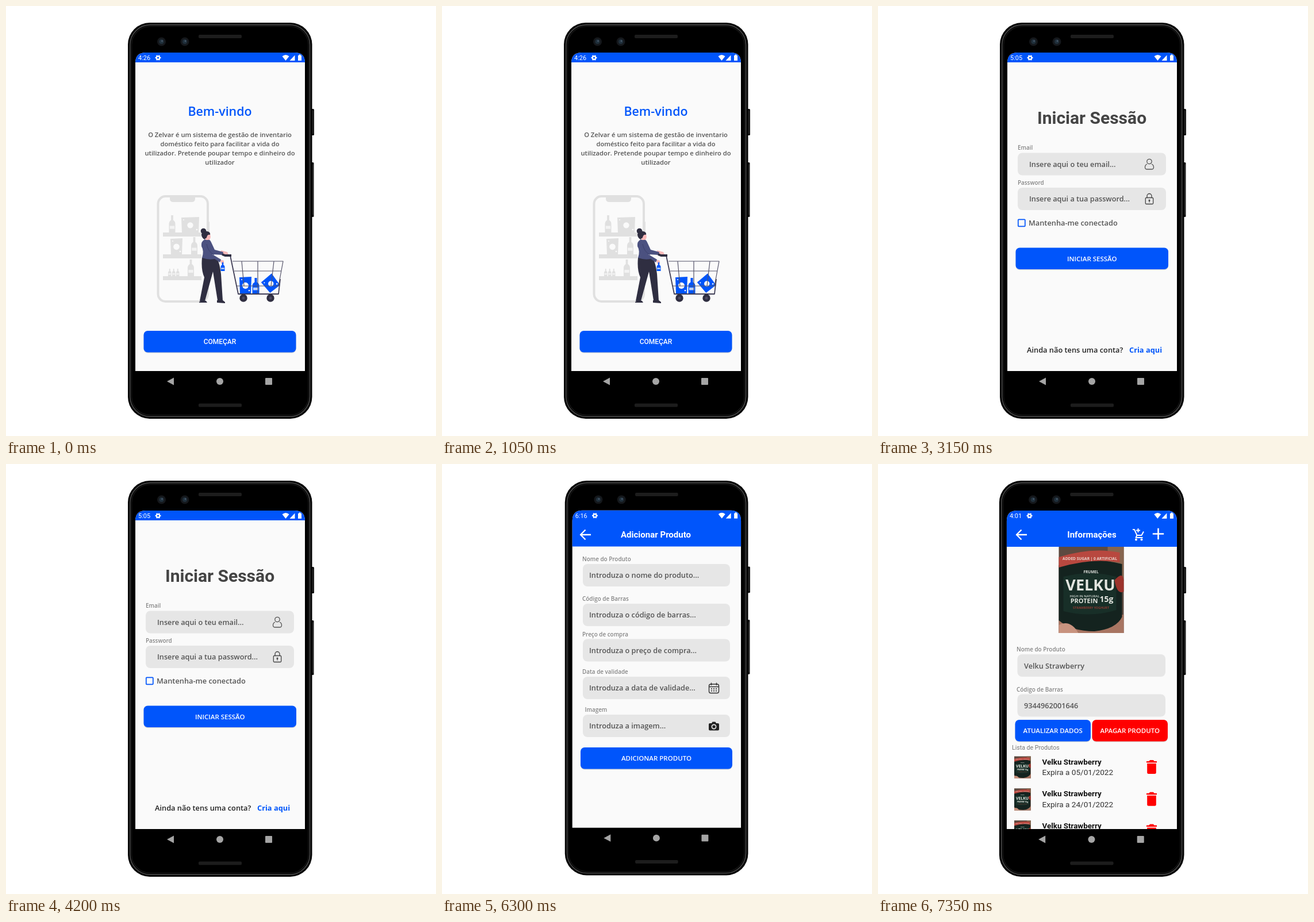
An HTML page for the animation above (8 s loop, 748 by 748 pixels).

```html
<!DOCTYPE html>
<html lang="pt">
<head>
<meta charset="utf-8">
<title>Inventário</title>
<style>
  html, body { margin: 0; width: 100%; height: 100%; overflow: hidden; background: #fff; }
  svg { display: block; width: 100%; height: 100%; }
  .os { font-family: "Open Sans", "Noto Sans", sans-serif; }
  .rb { font-family: Roboto, sans-serif; }
</style>
</head>
<body>
<svg id="stage" viewBox="0 0 748 748"></svg>
<script>
const LOOP = 8000;
const BLUE = '#0055fb', INK = '#2f2e41', GREY = '#e0e0e0', FIELD = '#e6e6e6', SKIN = '#f9b9b9';

// Basic shapes
const rect = (x, y, w, h, fill, r = 0, more = '') =>
  `<rect x="${x}" y="${y}" width="${w}" height="${h}" rx="${r}" fill="${fill}" ${more}/>`;
const circle = (x, y, r, fill, more = '') => `<circle cx="${x}" cy="${y}" r="${r}" fill="${fill}" ${more}/>`;
const path = (d, fill, more = '') => `<path d="${d}" fill="${fill}" ${more}/>`;
const line = (d, color, w = 1.4, more = '') =>
  path(d, 'none', `stroke="${color}" stroke-width="${w}" stroke-linejoin="round" ${more}`);
const at = (x, y, body, s = 1) => `<g transform="translate(${x} ${y}) scale(${s})">${body}</g>`;

const text = (font, s, x, y, size, fill, weight, anchor) =>
  `<text class="${font}" x="${x}" y="${y}" font-size="${size}" fill="${fill}"` +
  ` font-weight="${weight}" text-anchor="${anchor}">${s}</text>`;
const sans = (s, x, y, size, fill, weight = 600, anchor = 'start') => text('os', s, x, y, size, fill, weight, anchor);
const robo = (s, x, y, size, fill, weight = 400, anchor = 'start') => text('rb', s, x, y, size, fill, weight, anchor);

// Icons, centred on the origin
const gear = (r, color) =>
  circle(0, 0, r * .55, 'none', `stroke="${color}" stroke-width="${r * .45}"`) +
  circle(0, 0, r * .86, 'none',
    `stroke="${color}" stroke-width="${r * .28}" pathLength="12" stroke-dasharray="1 1" stroke-dashoffset=".5"`);
const plus = (r, w = 2.6) => line(`M${-r} 0H${r}M0 ${-r}V${r}`, '#fff', w);
const user = circle(0, -4.5, 4.2, 'none', 'stroke="#555" stroke-width="1.3"') +
  line('M-4 0Q-7.5 1.5-7.5 5.5Q-7.5 9-4 9H4Q7.5 9 7.5 5.5Q7.5 1.5 4 0', '#555', 1.3);
const mail = line('M-8.5-6H8.5V6H-8.5ZL0 1.5L8.5-6M-8.5-6L0 1.5M-8.5 6L-2.5-.7M8.5 6L2.5-.7', '#444', 1.2);
const lock = rect(-6.7, -2, 13.4, 11, 'none', 1.5, 'stroke="#444" stroke-width="1.3"') +
  line('M-4-2V-5A4 4 0 0 1 4-5V-2', '#444', 1.3) + circle(0, 2.5, 1.5, '#444') + line('M0 3V6', '#444', 1.3);
const calendar = rect(-8.5, -7, 17, 15.5, 'none', 3, 'stroke="#333" stroke-width="1.4"') +
  line('M-8.5-2.5H8.5M-4.5-9.5V-5M4.5-9.5V-5', '#333') +
  line('M-5 1.2H5.5M-5 4.7H5.5', '#333', 1.8, 'stroke-dasharray="2 2"');
const camera = path('M-7-5H-4L-2.5-7.5H2.5L4-5H7Q9-5 9-3V5.5Q9 7.5 7 7.5H-7Q-9 7.5-9 5.5V-3Q-9-5-7-5Z', '#222') +
  circle(0, 1, 3.6, '#222', 'stroke="#e6e6e6" stroke-width="1.7"');
const back = line('M9.5 0H-8M0-8.5L-8.5 0L0 8.5', '#fff', 2.4);
const trash = path('M-9-10H-4.5L-3-12H3L4.5-10H9V-7.5H-9ZM-7.8-6H7.8V9.5Q7.8 12 5.3 12H-5.3Q-7.8 12-7.8 9.5Z', '#f00');
const cartIcon = line('M-9.5-8.5H-6.5L-2 1.5H6L9.5-5M-2 1.5L-4 5.5H8M0-10.5V-3.5M-3.5-7H3.5', '#fff', 1.9) +
  circle(-3.5, 9, 2, '#fff') + circle(6, 9, 2, '#fff');
const home = path('M0-7L8 .3H5.5V6.5H1.8V2H-1.8V6.5H-5.5V.3H-8Z', '#444');
const folder = path('M-6.5-6H-2L0-4H6.5Q8-4 8-2.5V4.5Q8 6 6.5 6H-6.5Q-8 6-8 4.5V-4.5Q-8-6-6.5-6Z', '#0a2f92');
const basket = path('M-8.5-1.5H8.5L6.3 7H-6.3Z', '#444') + line('M-5-1L0-7L5-1', '#444', 1.8) + circle(0, 2.7, 1.8, '#fff');

// Widgets
const field = (x, y, right, h = 39) => rect(x, y, right - x, h, FIELD, 8);
const label = (s, x, y) => sans(s, x, y, 9.9, '#858585');
const hint = (s, x, y) => sans(s, x, y, 12.7, '#555');
const button = (s, x, y, w, fill = BLUE, write = sans, size = 11.5, weight = 600) =>
  rect(x, y + 1.3, w, 37.5, '#000', 7, 'opacity=".14"') + rect(x, y, w, 37.5, fill, 7) +
  write(s, x + w / 2, y + 23, size, '#fff', weight, 'middle');
const checkbox = (x, y) => rect(x, y, 12, 12, 'none', 1, `stroke="${BLUE}" stroke-width="1.7"`);
const title = s => robo(s, 372, 205, 30, '#444', 700, 'middle');
const bar = s => robo(s, 372, 127.5, 15, '#fff', 700, 'middle');

// Device, clock and system bars; sx and sy absorb the slight size differences
function device(clock, headerBottom, sx = 1, sy = 1) {
  const grille = y => rect(335, y, 75, 6, '#1d1d1d', 2);
  const lens = x => circle(x, 62, 7.5, '#15181c') + circle(x, 62, 4, '#20303c') + circle(x + 1, 61, 1.4, '#48596a');
  return `<g transform="matrix(${sx} 0 0 ${sy} ${532 * (1 - sx)} ${29 * (1 - sy)})">` +
    rect(529, 179, 7, 46, '#111', 1.5) + rect(529, 272, 6.5, 95, '#111', 1.5) +
    line('M534 182V222M534 276V363', '#3a3a3a', 1) +
    rect(212, 29, 320.5, 689, '#050505', 38) +
    rect(215.8, 32.8, 312.8, 681.4, '#000', 35, 'stroke="#505050" stroke-width="1.4"') +
    rect(218.5, 35.5, 307.5, 676, '#000', 32, 'stroke="#161616" stroke-width="1.5"') +
    grille(50) + grille(691.5) + lens(270.5) + lens(311) +
    path('M225 635V99Q225 81 243 81H502Q520 81 520 99V635Z', '#fafafa') +
    path(`M225 ${headerBottom}V99Q225 81 243 81H502Q520 81 520 99V${headerBottom}Z`, BLUE) +
    robo(clock, 230, 94, 11, '#fff') + at(264.5, 90, gear(5, '#fff')) +
    path('M480.5 87.5Q486.5 82.5 492.5 87.5L486.5 95ZM493.5 95L502.5 85.5V95Z', '#fff') +
    path('M508 86H509.5V84.5H512.5V86H514V95H508Z', '#fff') +
    path('M280 653L292 646.5V659.5Z', '#a5a5a5') + circle(372, 653, 6, '#a5a5a5') +
    rect(451, 647, 12, 12, '#a5a5a5', 1) + '</g>';
}

// Welcome drawing
const bottle = (x, y, w, h, fill) =>
  path(`M${x + w * .33} ${y}h${w * .34}v${h * .28}q${w * .33} ${h * .08} ${w * .33} ${h * .22}V${y + h}H${x}` +
    `V${y + h * .5}q0 ${-h * .14} ${w * .33} ${-h * .22}Z`, fill) +
  rect(x + w * .12, y + h * .62, w * .76, h * .17, '#fafafa', 0, 'opacity=".75"');
const pack = (x, y, w, h, fill, dot = '#fafafa') =>
  path(`M${x} ${y + 1}L${x + w} ${y}L${x + w - 1} ${y + h}H${x + 1}Z`, fill) +
  circle(x + w / 2, y + h * .53, h * .19, dot) + circle(x + 4, y + 5, 1, dot) + circle(x + w - 4, y + h - 5, 1.3, dot);

const shelves =
  rect(264.5, 331, 86.5, 183, 'none', 13, `stroke="${GREY}" stroke-width="4"`) +
  path('M285 330H329V335Q329 341 323 341H291Q285 341 285 335Z', GREY) +
  rect(351, 375, 3, 22, GREY, 1) +
  [394, 432, 470].map(y => rect(273, y, 67, 7, GREY)).join('') +
  bottle(283.5, 364, 11, 30, GREY) + pack(305, 367, 31, 27, GREY) +
  pack(286, 404, 21, 28, GREY) + bottle(322, 402, 11, 30, GREY) +
  [282, 289, 296].map(x => bottle(x, 457, 5.5, 13, GREY)).join('') + bottle(316, 441, 11, 29, GREY);

const shopper =
  path('M341 438Q339 459 345 472L337 513H346L357 473L360 462L368 512H377L374 466Q372 449 367 438Z', INK) +
  path('M336 515Q339 511 348 513L350 516H336ZM367 516V512L376 511L381 515V517Z', INK) +
  path('M372 441L379 443L379 448L375 449Z', SKIN) + path('M374 425L385 428L387 432L373 433Z', SKIN) +
  path('M346 406Q354 404 357 411L363 424L378 428L377 433L359 432L374 441L372 446L363 440Q352 442 341 438Q345 426 340 418Q339 409 346 406Z', '#4b5180') +
  line('M349 414Q351 427 362 433', '#3c416d', 1) +
  path('M347 396H355L356 402Q355 407 351 407H347Z', SKIN) +
  circle(343.5, 391.5, 4.8, INK) + path('M340 397Q343 390 350 392Q356 393 355 398Q350 397 349 403L345 406Q340 403 340 397Z', INK) +
  bottle(373.5, 446, 7, 15, BLUE);

const trolley =
  pack(406, 471, 21, 29, BLUE) + bottle(428.5, 473, 12, 27, BLUE) +
  `<g transform="rotate(-38 460 482)">${pack(448, 470, 24, 25, BLUE)}</g>` +
  line('M394 444H482L474 487H402M397 461H479M410 444L414 487M438 444V500M466 444L461 487', '#55546a', 1.2) +
  line('M390 434L404 501H474L477 475', '#3f3d56', 1.8) + line('M376 432L381 434H392', INK, 4) +
  [413, 460].map(x => circle(x, 508, 6.7, INK) + circle(x, 508, 2.5, '#4c4a62')).join('');

function welcome() {
  const lines = ['O Zelvar é um sistema de gestão de inventario', 'doméstico feito para facilitar a vida do',
    'utilizador. Pretende poupar tempo e dinheiro do', 'utilizador'];
  return device('4:26', 98) + sans('Bem-vindo', 372, 191, 21.4, BLUE, 600, 'middle') +
    lines.map((s, i) => sans(s, 372, 228 + 16 * i, 11.2, '#555', 600, 'middle')).join('') +
    shelves + shopper + trolley + button('COMEÇAR', 239.5, 565, 265, BLUE, robo, 12, 500);
}

function register() {
  const rows = [
    ['Nome de utilizador', 241, 248, 255, 'Insere aqui o teu username...', user],
    ['Email', 243, 312, 317.5, 'Insere aqui o teu email...', mail],
    ['Password', 243, 368, 373.5, 'Insere aqui a tua password...', lock],
    ['Confirmar password', 243, 431, 436, 'Confirma a password...', lock]];
  return device('6:11', 98, .9967, .9962) + title('Criar conta') +
    rows.map(([name, x, base, top, s, icon]) => label(name, x, base) + field(244, top, 501) +
      at(264, top + 19, icon) + hint(s, 281, top + 24)).join('') +
    checkbox(249, 485.5) + robo('Aceitar', 267, 496.5, 13.6, '#444', 500) +
    robo('termos e condições', 314, 496.5, 13.6, '#1488d8', 500) + line('M314 498.5H434', '#1488d8', 1) +
    button('CRIAR CONTA', 240, 518, 264.5) +
    sans('Ja tens conta?', 272, 601, 12.9, '#222') + sans('Inicia sessão aqui.', 367, 601, 12.75, BLUE, 700);
}

function login() {
  return device('5:05', 98) + title('Iniciar Sessão') +
    label('Email', 243, 250) + field(243, 255.5, 501) + hint('Insere aqui o teu email...', 263, 279.5) + at(472, 275, user) +
    label('Password', 243, 311) + field(243, 316, 501) + hint('Insere aqui a tua password...', 263, 340) + at(472, 335.5, lock) +
    checkbox(243.8, 371.3) + sans('Mantenha-me conectado', 262, 382, 12.8, '#555') +
    button('INICIAR SESSÃO', 239.5, 420.5, 265.5) +
    sans('Ainda não tens uma conta?', 259, 603, 12.8, '#222') + sans('Cria aqui', 437, 603, 12.8, BLUE, 700);
}

// Product pictures, reduced to flat tones
const tub = rect(0, 0, 113, 150, '#5d4a40') + rect(85, 0, 28, 60, '#86654f') +
  path('M0 128L113 118V150H0Z', '#a87562') + path('M0 32Q56 16 110 30V122Q100 143 62 147Q22 147 0 128Z', '#14231f') +
  path('M8 52Q55 40 100 52V110Q56 124 8 112Z', '#182f28') +
  path('M0 18Q56 0 106 10V27Q56 19 0 36Z', '#b8483f') + path('M97 58Q113 40 113 62V78Q101 84 97 58Z', '#9c332c') +
  path('M0 136Q20 126 34 150H0Z', '#c8937f') +
  sans('ADDED SUGAR | 0 ARTIFICIAL', 54, 23, 6.6, '#ecd6cf', 700, 'middle') +
  sans('FRUMEL', 56, 46, 6.5, '#dfe4df', 700, 'middle') +
  sans('VELKU', 55, 76, 27, '#e3e6e0', 700, 'middle') +
  sans('HIGH IN NATURAL', 45, 88, 6, '#d0d6d0', 600, 'middle') +
  sans('PROTEIN', 44, 98, 11, '#e3e6e0', 700, 'middle') + sans('15g', 83, 96, 14, '#e3e6e0', 700, 'middle') +
  sans('STRAWBERRY YOGHURT', 56, 108, 5.5, '#a33c34', 600, 'middle');
const water = rect(0, 0, 29, 38, '#5b9c8b') + rect(0, 0, 10, 38, '#73b09f') + rect(20, 0, 9, 38, '#397666') +
  path('M12 2H17V7L21 13V37H9V13L12 7Z', '#9ccbc7') + rect(9, 18, 12, 7, '#3c85a0');
const rice = rect(0, 0, 29, 38, '#b58a68') + rect(0, 28, 29, 10, '#8c5634') +
  path('M5 2L24 0L27 36L9 38Z', '#26222b') + path('M5 2L24 0L25 12L6 15Z', '#6d3a78') + rect(10, 23, 14, 5, '#91895b');
const cookie = rect(0, 0, 38, 14, '#8176b9') + circle(10, 6, 4, '#c2bbdc') + circle(25, 7, 5, '#c89a65') +
  circle(31, 9, 3.5, '#a4744d') + rect(0, 11, 38, 3, '#6b5ca6');

function products() {
  const rows = [['6x Agua', '08'], ['1x Arroz', '28'], ['3x Lirvo Choco Cookie', '20'], ['3x Velku Strawberry', '05']];
  return device('4:00', 144) + bar('Lista de Produtos') +
    rect(227, 144, 291, 228, '#e3e3e3', 2) + rect(227, 144, 290, 226, '#fdfdfd', 2) +
    rows.map(([name, day], i) => robo(name, 289, 170 + 55.8 * i, 13.4, '#111', 700) +
      robo(`Expira em: ${day}/01/2022`, 289, 188.5 + 55.8 * i, 13.6, '#333')).join('') +
    at(241, 156, water) + at(241, 211.5, rice) + at(236.5, 279.5, cookie) + at(241, 323, tub, .255) +
    circle(476, 558, 21.5, '#000', 'opacity=".13"') + circle(476, 555, 21.3, BLUE) + at(476, 555, plus(7.5, 2)) +
    at(261, 617, home) + at(335, 617, folder) + at(409, 617, basket) + at(482.5, 617, gear(7.5, '#444')) +
    rect(298, 633, 74, 2, BLUE);
}

function addProduct() {
  const rows = [
    ['Nome do Produto', 244, 169, 174, 'Introduza o nome do produto...'],
    ['Código de Barras', 244, 238, 243, 'Introduza o código de barras...'],
    ['Preço de compra', 244, 300, 304.5, 'Introduza o preço de compra...'],
    ['Data de validade', 244, 365, 370, 'Introduza a data de validade...'],
    ['Imagem', 248.5, 431, 436, 'Introduza a imagem...']];
  return device('6:16', 144, .9945, .9962) + at(249.5, 123, back) + bar('Adicionar Produto') +
    rows.map(([name, x, base, top, s]) => label(name, x, base) + field(245, top, 501) + hint(s, 256, top + 24)).join('') +
    at(473, 390, calendar) + at(473, 456, camera) + button('ADICIONAR PRODUTO', 241, 493, 264);
}

function details() {
  const row = (y, day) => at(237, y, tub, .255) + robo('Velku Strawberry', 285.5, y + 14, 13.4, '#111', 700) +
    robo(`Expira a ${day}/01/2022`, 285.5, y + 32.5, 13.6, '#333') + at(476, y + 18.5, trash);
  return device('4:01', 144, 1.0035) + at(249.5, 123, back) + bar('Informações') +
    at(452.5, 122.5, cartIcon) + at(487.5, 121.5, plus(9.7)) + at(314.5, 144, tub) +
    label('Nome do Produto', 241, 326) + field(242.5, 331, 500) + hint('Velku Strawberry', 254, 355.5) +
    label('Código de Barras', 241, 396) + field(242.5, 400.5, 500) + hint('9344962001646', 254, 425) +
    button('ATUALIZAR DADOS', 238.5, 445, 131.5) + button('APAGAR PRODUTO', 372.5, 445, 131.5, '#f00') +
    robo('Lista de Produtos', 233, 496.5, 10.6, '#777') +
    '<clipPath id="list"><rect x="224" y="500" width="296" height="135"/></clipPath>' +
    `<g clip-path="url(#list)">${row(508.5, '05')}${row(564.3, '24')}${row(620, '28')}</g>`;
}

const scenes = [[0, welcome], [2100, register], [3150, login], [5250, products], [6300, addProduct], [7350, details]];
const stage = document.getElementById('stage');
stage.innerHTML = scenes.map(([, draw]) => `<g visibility="hidden">${draw()}</g>`).join('');
const layers = [...stage.children];

let shown = -1;
function tick() {
  const t = performance.now() % LOOP;
  const now = scenes.findLastIndex(([start]) => t >= start);
  if (now !== shown) {
    layers.forEach((g, i) => g.setAttribute('visibility', i === now ? 'visible' : 'hidden'));
    shown = now;
  }
  requestAnimationFrame(tick);
}
tick();
</script>
</body>
</html>
```
